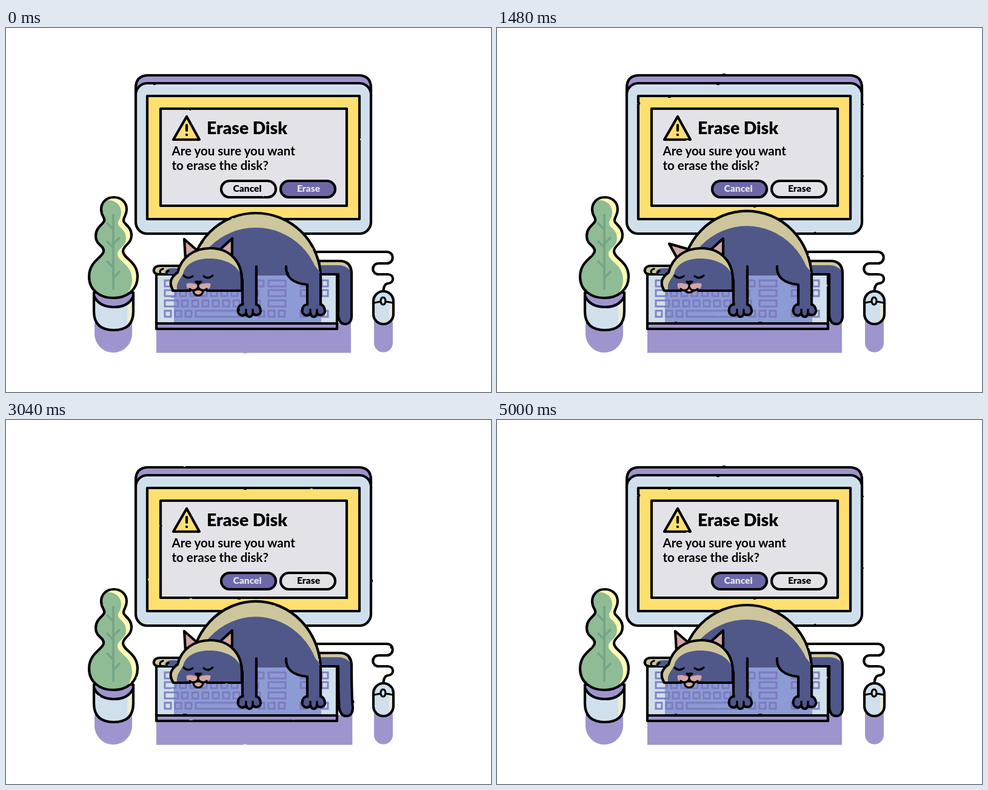
An HTML page for the animation above (5120 ms loop, 800 by 600 pixels).

```html
<!DOCTYPE html>
<html lang="en">
<head>
<meta charset="utf-8">
<title>Cat on keyboard</title>
<style>
html, body { margin: 0; width: 100%; height: 100%; overflow: hidden; background: #fff; }
svg { display: block; width: 800px; height: 600px; }
.ink { stroke: #000; stroke-width: 4.2; stroke-linecap: round; stroke-linejoin: round; }
.line { fill: none; }
.thin { stroke-width: 3.2; }
.ice { fill: #cfe0ec; }
.lilac { fill: #9f95ce; }
.sun { fill: #ffdf70; }
.cream { fill: #fffbb4; }
.glint { fill: #eaedd2; }
.fur { fill: #50588a; }
.tan { fill: #cdc69c; }
.pink { fill: #d2a7a4; }
.panel, .button rect { fill: #e2e2e8; }
text { font-family: Lato, sans-serif; font-weight: 700; font-size: 20.5px; }
.title { font-weight: 900; font-size: 28.3px; }
.button text { font-weight: 900; font-size: 15.6px; text-anchor: middle; }
.button.on rect { fill: #6c68a8; }
.button.on text { fill: #e2e2ee; }
</style>
</head>
<body>
<svg viewBox="0 0 800 600">
  <defs>
    <filter id="rough" filterUnits="userSpaceOnUse" x="0" y="0" width="800" height="600" color-interpolation-filters="sRGB">
      <feTurbulence id="noise" type="fractalNoise" baseFrequency="0.1" numOctaves="1" seed="1"/>
      <feDisplacementMap in="SourceGraphic" scale="1.8" xChannelSelector="R" yChannelSelector="G"/>
    </filter>
    <path id="leaf" d="M178 279C165 279 157 288 157 299C157 311 164 312 162 318C160 324 148 328 148 343C148 358 162 358 161 368C160 378 137 384 137 410C137 432 155 445 177 445C200 445 217 431 217 410C217 384 193 380 193 368C193 358 207 356 207 342C207 327 195 324 194 318C193 312 199 310 199 299C199 287 190 279 178 279Z"/>
    <clipPath id="leafClip"><use href="#leaf"/></clipPath>
    <path id="pot" d="M145 436V467Q145 498 178 498Q210 498 210 467V436Z"/>
    <clipPath id="potClip"><use href="#pot"/></clipPath>
    <clipPath id="mouseClip"><rect x="606" y="434" width="33" height="54" rx="16.5"/></clipPath>
    <path id="arch" d="M305 412A107 107 0 0 1 519 412"/>
    <clipPath id="archClip"><path d="M305 408A107 107 0 0 1 519 408Z" transform="translate(0 4)"/></clipPath>
    <path id="skull" d="M276 433C267 419 273 410 283 403C289 378 310 363 337 363C369 363 389 385 389 415V433Z"/>
    <clipPath id="skullClip"><use href="#skull"/></clipPath>
    <clipPath id="bellyClip"><rect x="290" y="280" width="240" height="128"/></clipPath>
    <g id="paw" class="ink fur">
      <path d="M391 455C381 457 379 473 390 474C393 474 395 472 396 470C397 478 406 478 407 470C409 474 419 475 420 467C420 459 416 457 413 455"/>
      <path class="line thin" d="M396 470V464M407 470V464"/>
    </g>
  </defs>

  <g filter="url(#rough)">
    <!-- monitor -->
    <path class="ink lilac" d="M214 112V99Q214 78 235 78H581Q602 78 602 99V112Z"/>
    <rect class="ink ice" x="214" y="91" width="388" height="248" rx="19"/>
    <rect class="ink sun" x="233" y="112" width="350" height="203"/>
    <rect class="ink panel" x="255" y="133" width="307" height="160"/>
    <path class="ink sun" d="M298 146L276 184H319Z"/>
    <path class="ink line" stroke-width="5" d="M298 160V169M298 176V176.2"/>
    <text class="title" x="331" y="175">Erase Disk</text>
    <text x="273.5" y="210">Are you sure you want</text>
    <text x="273.5" y="234">to erase the disk?</text>
    <g class="button" id="cancel">
      <rect class="ink" x="355" y="252" width="90" height="27" rx="13.5"/>
      <text x="398" y="270">Cancel</text>
    </g>
    <g class="button" id="erase">
      <rect class="ink" x="453" y="252" width="90" height="27" rx="13.5"/>
      <text x="499" y="270">Erase</text>
    </g>

    <!-- plant -->
    <path class="lilac" d="M146 485H208V504A31 31 0 0 1 146 504Z"/>
    <use href="#pot" class="ice"/>
    <g clip-path="url(#potClip)">
      <rect class="glint" x="200" y="436" width="10" height="56"/>
      <path class="ink lilac" d="M143 436Q150 460 178 460Q206 460 212 436Z"/>
    </g>
    <use href="#pot" class="ink line"/>
    <use href="#leaf" class="cream"/>
    <g clip-path="url(#leafClip)">
      <use href="#leaf" fill="#8fbc94" transform="translate(-9 5)"/>
    </g>
    <path fill="none" stroke="#75a488" stroke-width="3.6" stroke-linecap="round" d="M177 308V430M167 322L177 332M187 346L177 356M167 352L177 362M167 385L177 395M187 402L177 412"/>
    <use href="#leaf" class="ink line"/>

    <!-- mouse -->
    <path class="lilac" d="M607 470H638V519A15.5 15.5 0 0 1 607 519Z"/>
    <path class="ink line" d="M512 369H628C641 369 641 388 628 388H615C602 388 602 406 615 406H629C641 406 641 420 630 421C623 422 622 430 622 446"/>
    <g clip-path="url(#mouseClip)">
      <rect class="ice" x="605" y="433" width="35" height="57"/>
      <rect class="glint" x="632" y="452" width="8" height="32"/>
    </g>
    <rect class="ink line" x="606" y="434" width="33" height="54" rx="16.5"/>
    <path class="ink line thin" d="M607 453Q622 449 638 453"/>
    <ellipse class="ink ice thin" cx="622" cy="450" rx="4" ry="6"/>

    <!-- tail and keyboard -->
    <rect class="lilac" id="shade" x="248" y="486" width="321" height="49.5"/>
    <path class="ink fur" id="tail"/>
    <path class="tan" d="M519 386H550Q564 386 567 399Q560 391 548 391H519Z"/>
    <rect class="ink ice" x="248" y="406" width="298" height="81"/>
    <rect fill="#8d9bd4" x="277" y="408" width="243" height="77"/>
    <g id="keys" fill="none" stroke="#7a78bd" stroke-width="3" opacity=".9"/>
    <rect class="ink lilac" x="248" y="487" width="298" height="9"/>

    <!-- cat -->
    <path class="ink tan" d="M290 392H254C242 392 240 405 251 406H280"/>
    <path class="fur" d="M262 404Q262 397 272 396H290V406H262Z"/>
    <path class="ink line thin" d="M259 397Q252 399 255 405M268 400Q264 402 265 406"/>
    <g clip-path="url(#bellyClip)">
      <g id="body">
        <use href="#arch" class="tan"/>
        <g clip-path="url(#archClip)">
          <use href="#arch" class="fur" transform="translate(0 24)"/>
        </g>
        <use href="#arch" class="ink line"/>
      </g>
    </g>
    <path class="fur" d="M462 390C461 411 474 421 497 423V458H520V405L508 390ZM390 386H413V458H390Z"/>
    <use href="#paw"/>
    <use href="#paw" x="106"/>
    <path class="ink line" d="M413 393V456M390 415V456M462 393C461 411 474 421 497 423V456M519 405V456"/>

    <path class="ink pink" id="ear" d="M296 380L294 348L318 369"/>
    <path class="ink pink" d="M351 367L373 347V381"/>
    <use href="#skull" class="tan"/>
    <g clip-path="url(#skullClip)">
      <path class="fur" d="M282 433C280 417 290 413 293 402C299 386 317 380 335 380C361 380 383 390 390 412V433Z"/>
    </g>
    <path class="ink thin" id="jaw" fill="#d9a797" d="M309 431Q309 441 317 441Q325 441 325 431Z"/>
    <path class="pink" d="M298 421Q296 431 306 431Q315 431 317 424Q319 431 328 431Q339 431 337 421Q327 419 317 424Q307 419 298 421Z"/>
    <path class="ink line" d="M303 433H276C267 419 273 410 283 403C289 378 310 363 337 363C369 363 389 385 389 415V433H332"/>
    <path class="ink line thin" d="M293 408Q300 415 308 409M326 409Q333 415 341 408M317 421V427M303 430Q311 437 317 427Q323 437 331 430"/>
    <path class="ink thin" d="M313 418H322L317.500 422Z"/>
  </g>
</svg>
<script>
const LOOP = 5120, STEP = 40, LAST = 5000;
const $ = id => document.getElementById(id);
const clamp = x => Math.min(1, Math.max(0, x));
const ease = (t, a, b) => { const x = clamp((t - a) / (b - a)); return x * x * (3 - 2 * x); };
const bump = (t, a, b) => Math.sin(Math.PI * clamp((t - a) / (b - a))) ** 2;

function key(x, y, w = 10) {
  const r = document.createElementNS("http://www.w3.org/2000/svg", "rect");
  for (const [k, v] of Object.entries({ x, y, width: w, height: 10 })) r.setAttribute(k, v);
  $("keys").append(r);
}

// Each row: y, width of first and last key, first and last x of the small keys
[[416, 10, 28, 279, 415], [432, 18, 28, 287, 415], [449, 22, 28, 290, 418]].forEach(([y, first, last, from, to]) => {
  key(262, y, first);
  for (let x = from; x <= to; x += 17) key(x, y);
  key(433, y, last);
});
[262, 279, 296, 416, 433, 450].forEach(x => key(x, 466));
key(313, 466, 84);
[416, 432, 466].forEach(y => [486, 504, 521].forEach(x => key(x, y)));
key(504, 449);

function tailPath(s) {
  return `M517 384H550C563 384 570 391 570 405C570 432 570 450 ${570 + 7 * s} 470
    C${571 + 9 * s} 482 ${567 + 9 * s} 488 ${559 + 9 * s} 488
    C${552 + 9 * s} 488 ${549 + 8 * s} 482 ${548 + 6 * s} 474
    C${548 + 2 * s} 455 548 440 548 406H517`;
}

function draw(now) {
  const t = Math.min(LAST, Math.floor((now % LOOP) / STEP) * STEP);
  const breath = Math.sin(Math.PI * t / LOOP) ** 3;
  const swing = bump(t, 2200, 3200);
  const open = 1 - ease(t, 450, 850) + ease(t, 1850, 2400);
  const eraseOn = Math.floor(t / 880) % 2 === 0;

  $("body").setAttribute("transform", `translate(0 408) scale(1 ${1 + 0.068 * breath}) translate(0 -408)`);
  $("tail").setAttribute("d", tailPath(swing));
  $("shade").setAttribute("width", 321 + 10 * swing);
  $("ear").setAttribute("transform", `rotate(${-28 * bump(t, 1240, 1640)} 306 374)`);
  $("jaw").setAttribute("transform", `translate(0 ${-5 * (1 - open)})`);
  $("erase").classList.toggle("on", eraseOn);
  $("cancel").classList.toggle("on", !eraseOn);
  $("noise").setAttribute("seed", 1 + t / STEP % 8);
}

function tick() {
  draw(performance.now());
  requestAnimationFrame(tick);
}
tick();
</script>
</body>
</html>
```
